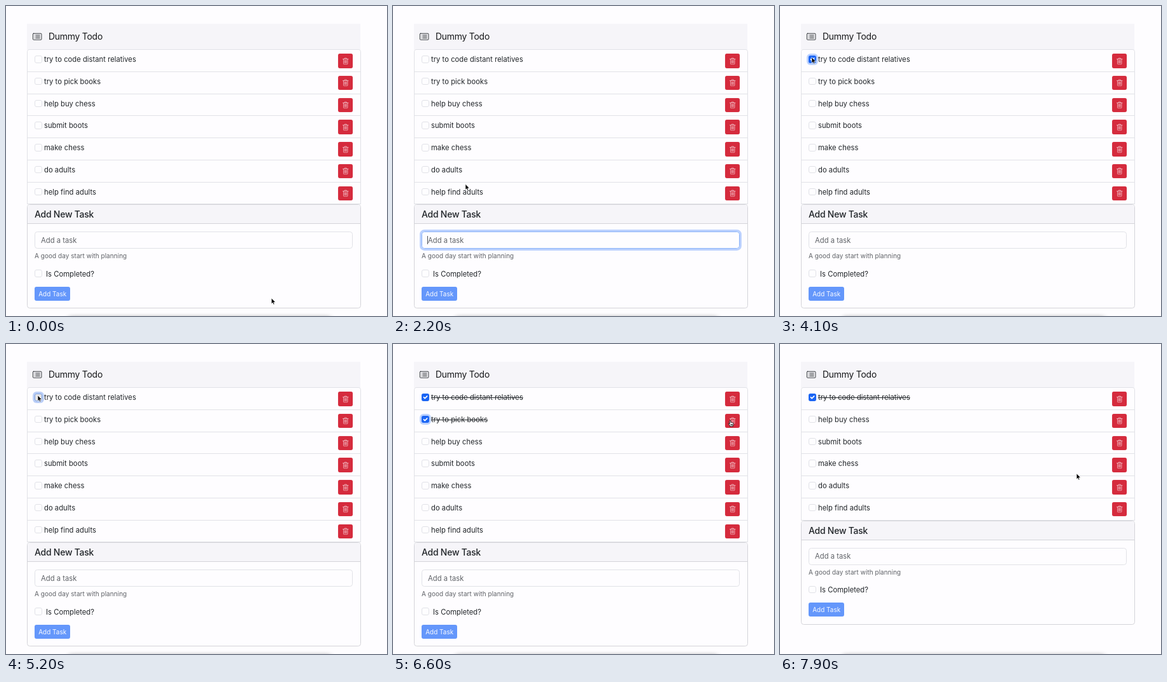
An HTML page that plays this animation: 600x488 px, repeating every 8000 ms.

```html
<!DOCTYPE html>
<html lang="en">
<head>
<meta charset="utf-8">
<title>Todo list</title>
<style>
  :root { --line: #e1e2e7; --focus: #8cb4f9; --ring: 0 0 0 2.9px rgba(25, 105, 250, .29); }
  html, body { margin: 0; width: 100%; height: 100%; overflow: hidden; background: #fefdff; }
  body { position: relative; font: 11.25px/16px Inter, "Open Sans", sans-serif; letter-spacing: .01px; color: #212529; }
  * { box-sizing: border-box; }
  svg { display: block; overflow: visible; fill: none; stroke-linecap: round; stroke-linejoin: round; }
  .stage { position: absolute; left: 0; top: 0; width: 600px; height: 488px; overflow: hidden; }
  .stage * { position: absolute; white-space: nowrap; }
  .stage svg * { position: static; }

  /* every animation shares one clock */
  .anim { animation: 8s step-end infinite; }

  .brand { left: 33px; top: 28px; width: 525px; height: 41px; background: #f6f5f9; }
  .brand svg { left: 9px; top: 12.8px; width: 14.4px; height: 14.4px; stroke: #212529; }
  .brand span { left: 34px; top: 10px; font-size: 14px; line-height: 20px; letter-spacing: -.28px; color: #17181a; }

  .stage .flow, .stage .list, .stage .row, .stage .card { position: relative; }
  .flow { left: 33px; top: 68px; width: 525.5px; }
  .list { border: 1px solid var(--line); border-bottom: 0; border-radius: 4.3px 4.3px 0 0; }
  .row { height: 34.75px; border-bottom: 1px solid var(--line); }
  .row > span { left: 26px; top: 7px; text-decoration: line-through transparent; }
  .box { left: 11px; top: 9px; width: 11.6px; height: 11.6px; border: 1px solid var(--line); border-radius: 3px; background: #fefdff; }
  .tick { left: -1px; top: -1px; width: 11.6px; height: 11.6px; border-radius: 3px; background: #1b65f4; opacity: 0; }
  .tick svg { width: 11.6px; height: 11.6px; stroke: #fff; stroke-width: 3; }
  .del { left: 488.5px; top: 6px; width: 23.5px; height: 22.6px; border-radius: 3px; background: #d52b3d; box-shadow: 0 0 1px rgba(213, 43, 61, .5); }
  .del svg { left: 6px; top: 5.5px; width: 11.5px; height: 11.5px; stroke: #f8dbe0; stroke-width: .95; }

  .card { height: 164px; border: 1px solid #d4d4d9; border-radius: 4.3px; }
  .head { left: 0; top: 0; width: 100%; height: 30px; border-bottom: 1px solid #d4d4d9; background: #f6f5f9; border-radius: 3.3px 3.3px 0 0; }
  .head span { left: 11px; top: 5px; font-size: 14px; line-height: 20px; font-weight: 500; letter-spacing: -.26px; }
  .field { left: 11px; top: 42px; width: 501px; height: 27px; border: 1px solid var(--line); border-radius: 4.3px; }
  .field span { left: 9px; top: 4.6px; color: #5f6267; }
  .caret { left: 8px; top: 6px; width: 1px; height: 13px; background: #4a4d52; opacity: 0; }
  .help { left: 11px; top: 72px; font-size: 10px; letter-spacing: .04px; color: #5f6267; }
  .card .box { top: 102px; }
  .label { left: 29px; top: 100.3px; }
  .add { left: 11px; top: 128.7px; width: 56.3px; height: 22.3px; border-radius: 3px; background: #6497fb; color: #fafbff; font-size: 9.95px; line-height: 22px; letter-spacing: .02px; text-align: center; }

  .dock { left: 96px; top: 490px; width: 418px; height: 30px; border-radius: 8px; box-shadow: 0 0 7px rgba(0, 0, 0, .45); }

  .pointer { left: 0; top: 0; width: 0; height: 0; animation: move 8s ease-in-out infinite; }
  .pointer svg { left: 0; top: 0; width: 1px; height: 1px; }
  .pointer .arrow { left: -.4px; top: -.9px; animation-name: arrow; }
  .hand { opacity: 0; animation-name: hand; }

  .first .box { animation-name: focus-a; }
  .first .tick { animation-name: tick-a; }
  .first span { animation-name: strike-a; }
  .second { animation-name: remove; }
  .second .box { animation-name: focus-b; }
  .second .tick { animation-name: tick-b; }
  .second span { animation-name: strike-b; }
  .second .del { animation-name: press; }
  .third .del { animation-name: hover; }
  .field { animation: focus-field 8s linear infinite; }
  .caret { animation-name: blink; }

  @keyframes move {
    0% { transform: translate(418px, 461px); }
    11.25% { transform: translate(204px, 52px); }
    13.75% { transform: translate(203px, 37px); }
    27.5% { transform: translate(114px, 281.5px); }
    32% { transform: translate(40px, 125px); }
    34% { transform: translate(49px, 95px); }
    38%, 68% { transform: translate(50px, 82px); }
    70.5%, 73.75% { transform: translate(50px, 116px); }
    81.25%, 90.6% { transform: translate(531px, 120px); }
    98%, 100% { transform: translate(467px, 205px); }
  }
  @keyframes arrow { 0%, 92% { opacity: 1; } 80.5% { opacity: 0; } }
  @keyframes hand { 0%, 92% { opacity: 0; } 80.5% { opacity: 1; } }

  @keyframes focus-field {
    0%, 13.75%, 50.625%, 100% { border-color: var(--line); box-shadow: 0 0 0 2.9px rgba(25, 105, 250, 0); }
    15.625%, 48.75% { border-color: var(--focus); box-shadow: var(--ring); }
  }
  @keyframes blink {
    0%, 19.375%, 31.875%, 44.375% { opacity: 0; }
    13.125%, 25.625%, 38.125% { opacity: 1; }
  }

  @keyframes focus-a {
    0%, 72.5% { border-color: var(--line); box-shadow: none; filter: none; }
    48.75%, 57.5%, 64.375% { border-color: var(--focus); box-shadow: var(--ring); filter: brightness(.9); }
    50.625%, 58.75%, 65.75% { border-color: var(--focus); box-shadow: var(--ring); filter: none; }
  }
  @keyframes tick-a { 0%, 58.75% { opacity: 0; } 50.625%, 65.75%, 100% { opacity: 1; } }
  @keyframes strike-a {
    0%, 60.375% { text-decoration-color: transparent; }
    52.25%, 67.375%, 100% { text-decoration-color: #212529; }
  }

  @keyframes focus-b {
    0%, 85.6% { border-color: var(--line); box-shadow: none; filter: none; }
    72.5% { border-color: var(--focus); box-shadow: var(--ring); filter: brightness(.9); }
    73.5% { border-color: var(--focus); box-shadow: var(--ring); filter: none; }
  }
  @keyframes tick-b { 0% { opacity: 0; } 73.5%, 100% { opacity: 1; } }
  @keyframes strike-b { 0% { text-decoration-color: transparent; } 75%, 100% { text-decoration-color: #212529; } }
  @keyframes press {
    0% { background: #d52b3d; box-shadow: 0 0 1px rgba(213, 43, 61, .5); }
    82.5% { background: #d52b3d; box-shadow: 0 0 1px rgba(213, 43, 61, .5); animation-timing-function: linear; }
    84.4% { background: #bb2d3b; box-shadow: 0 0 1px rgba(213, 43, 61, .5); }
    85.6%, 100% { background: #b02a37; box-shadow: 0 0 0 2.9px rgba(225, 83, 97, .5); }
  }
  @keyframes remove {
    0% { height: 34.75px; border-bottom-width: 1px; visibility: visible; }
    88.1%, 100% { height: 0; border-bottom-width: 0; visibility: hidden; }
  }
  @keyframes hover { 0%, 92% { background: #d52b3d; } 88.1% { background: #bb2d3b; } }
</style>
</head>
<body>
<svg width="0" height="0" style="position:absolute">
  <symbol id="bin" viewBox="0 0 16 16">
    <path d="M2 3.5h12M5.5 3V2.2Q5.5 1.5 6.2 1.5h3.6q.7 0 .7.7V3M3.5 4v9.5q0 1.5 1.5 1.5h6q1.5 0 1.5-1.5V4M6 6.2v6M8 6.2v6M10 6.2v6"/>
  </symbol>
  <symbol id="check" viewBox="0 0 20 20"><path d="M6 10l3 3 6-6"/></symbol>
</svg>

<div class="stage">
  <div class="brand">
    <svg viewBox="0 0 16 16">
      <rect x=".5" y="2.5" width="15" height="11" rx="1"/>
      <path d="M5.5 5.5h7M5.5 8h7M5.5 10.5h7M3.5 5.5h.01M3.5 8h.01M3.5 10.5h.01"/>
    </svg>
    <span>Dummy Todo</span>
  </div>

  <div class="flow">
    <div class="list" id="list"></div>
    <div class="card">
      <div class="head"><span>Add New Task</span></div>
      <div class="field"><span>Add a task</span><i class="caret anim"></i></div>
      <div class="help">A good day start with planning</div>
      <div class="box"></div>
      <div class="label">Is Completed?</div>
      <div class="add">Add Task</div>
    </div>
  </div>

  <div class="dock"></div>

  <div class="pointer">
    <svg class="arrow anim"><path d="M0 0V8.9L2 7.1 3.3 10 4.9 9.4 3.6 6.5H6.4Z" fill="#000" stroke="#fff" stroke-width=".7"/></svg>
    <svg class="hand anim"><path d="M-.9 .8Q0-.5.9.8V3.6Q1.9 3 2.4 3.8 3.4 3.3 3.9 4.2 5.2 3.9 5.2 5.2V7Q5 8 4.4 8.6V9.8H-.3V8.8L-2.6 5.7Q-2.9 4.6-1.9 4.8L-.9 5.8ZM1 6.4V8M2.4 6.4V8M3.7 6.4V8" fill="#fff" stroke="#000" stroke-width=".8"/></svg>
  </div>
</div>

<script>
  const tasks = ["try to code distant relatives", "try to pick books", "help buy chess",
    "submit boots", "make chess", "do adults", "help find adults"];
  const roles = ["first", "second", "third"];
  const icon = id => `<svg><use href="#${id}"/></svg>`;

  document.getElementById("list").innerHTML = tasks.map((task, i) => `
    <div class="row anim ${roles[i] || ""}">
      <div class="box anim"><div class="tick anim">${icon("check")}</div></div>
      <span class="anim">${task}</span>
      <div class="del anim">${icon("bin")}</div>
    </div>`).join("");
</script>
</body>
</html>
```
